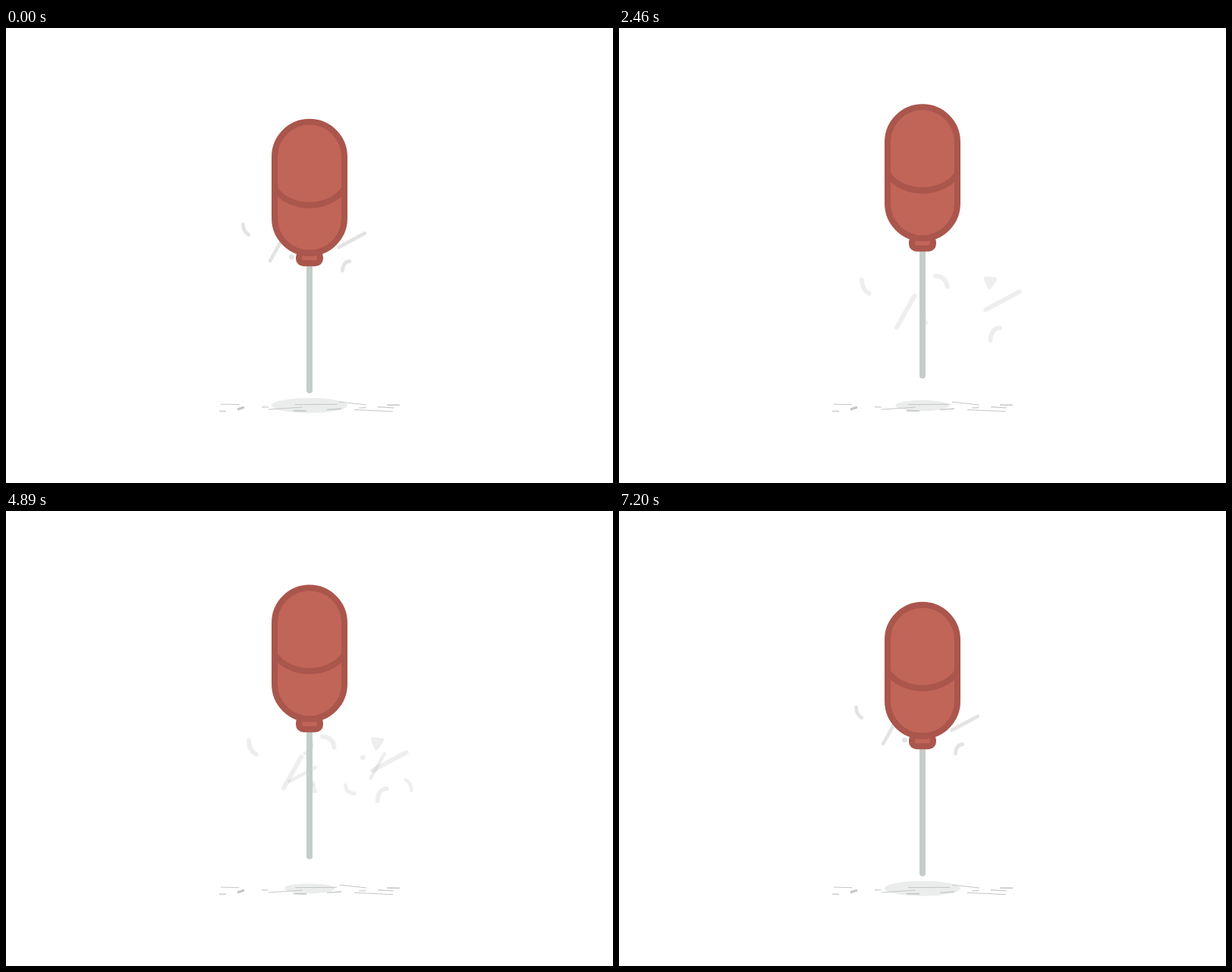
An HTML page with a canvas for the animation above (7230 ms loop, 800 px wide and 600 px high).

```html
<!DOCTYPE html>
<html lang="en">
<head>
<meta charset="utf-8">
<title>Floating balloon</title>
<style>
html, body { margin: 0; width: 100%; height: 100%; overflow: hidden; background: #fff; }
canvas { display: block; }
</style>
</head>
<body>
<canvas id="stage" width="800" height="600"></canvas>
<script>
const ctx = document.getElementById('stage').getContext('2d');
const LOOP = 7230, CYCLE = 7200, STEP = 30, RISE = 27;
const FILL = '#c16558', EDGE = '#aa564c', STICK = '#c5cdc9', SHADOW = '#ebedec';

// Confetti, with y measured from the top of the leftmost curl
const strokes = new Path2D(
  'M312.5 .5Q312.5 10.5 320 14.5M366 17L348 49M473 12.5L438.5 31' +
  'M453 49.5Q444 50 443.5 62M387.5 -3.5Q398 -3 399.5 7.5');
const wedge = new Path2D('M439 -1L448 0L442.5 8Z');

// Times in seconds: ramp up to speed, then fall steadily; visible and dark spans
const slow = { speed: 62.8, ramp: 1.5, end: 4.2, dark: [1.65, 2.52] };
const fast = { speed: 110, ramp: 0.94, end: 2.66, dark: [1.05, 1.7] };
const large = d => [1.295, 0, 0, 1.295, 320 - 312.5 * 1.295, 156.5 + d];
const turned = d => [-1, 0, 0, -1, 817 + 0.26 * d, 254.6 + d];
const small = d => [1, 0, 0, 1, 0, 170.2 + d];
const bursts = [
  { start: 400, ...fast, place: large },
  { start: 2317, ...slow, end: 3.95, place: turned },
  { start: 3097, ...fast, place: large },
  { start: 5050, ...slow, place: small }
];

// x1, y1, x2, y2, thickness
const ground = [
  [283, 496, 307, 496.7, 1], [281, 505.2, 290, 505.4, 1.2], [305, 503, 314, 500, 3],
  [337, 499.6, 346, 500, 1.2], [346, 503, 391, 500, 1.2], [379, 504.6, 396, 504.9, 1.8],
  [381, 496.6, 436, 496.3, 1], [423, 503.4, 442, 502, 1.4], [439, 493, 475, 497, 1.1],
  [465, 501, 474, 500.6, 1.2], [490, 499.6, 511, 501, 1.2], [502, 497, 519, 497.2, 1.5],
  [459, 503.4, 510, 505.7, 1]
];

// cubic-bezier(.42, 0, .58, 1)
function easeInOut(x) {
  let lo = 0, hi = 1, s;
  for (let i = 0; i < 24; i++) {
    s = (lo + hi) / 2;
    const u = 1 - s;
    if (3 * u * u * s * 0.42 + 3 * u * s * s * 0.58 + s ** 3 < x) lo = s; else hi = s;
  }
  return s * s * (3 - 2 * s);
}

function line(x1, y1, x2, y2, width) {
  ctx.lineWidth = width;
  ctx.beginPath();
  ctx.moveTo(x1, y1);
  ctx.lineTo(x2, y2);
  ctx.stroke();
}

function box(x, y, w, h, r) {
  ctx.beginPath();
  ctx.roundRect(x, y, w, h, r);
  ctx.fill();
  ctx.stroke();
}

function drawBurst({ start, speed, ramp, end, dark, place }, t) {
  const age = (t - start + CYCLE) % CYCLE / 1000;
  if (age < 0.18 || age > end) return;
  const fallen = speed * (age < ramp ? age * age / (2 * ramp) : age - ramp / 2);
  const isDark = age > dark[0] && age < dark[1];
  ctx.save();
  ctx.transform(...place(fallen));
  ctx.fillStyle = ctx.strokeStyle = `rgba(0,0,0,${isDark ? 0.11 : 0.068})`;
  ctx.lineCap = ctx.lineJoin = 'round';
  ctx.lineWidth = 4.6;
  ctx.stroke(strokes);
  // Rounded wedge and dot, each painted once so the tint stays even
  ctx.fill(new Path2D('M438.5 -3L448.5 -2Q451 -1 449.5 1.5L444.5 9Q442.5 11 440.5 9L437 1Q436 -3 438.5 -3Z'));
  ctx.beginPath();
  ctx.arc(376.5, 44, 3.5, 0, 7);
  ctx.fill();
  ctx.restore();
}

function drawBalloon(lift) {
  ctx.save();
  ctx.translate(0, -lift);
  ctx.lineCap = 'round';
  ctx.strokeStyle = STICK;
  line(400, 305, 400, 477.7, 8);
  ctx.lineCap = 'butt';
  ctx.fillStyle = FILL;
  ctx.strokeStyle = EDGE;
  ctx.lineWidth = 8;
  box(386, 296, 28, 14.2, 6);
  box(354, 123.8, 92, 173, 46);
  ctx.stroke(new Path2D('M354 211.7C374 241 426 241 446 211.7'));
  ctx.restore();
}

function draw(t) {
  const phase = t % 3600 / 1800;
  const up = easeInOut(phase < 1 ? phase : 2 - phase);
  ctx.fillStyle = '#fff';
  ctx.fillRect(0, 0, 800, 600);
  ctx.fillStyle = SHADOW;
  ctx.beginPath();
  ctx.ellipse(400, 497.8, 50 - 20 * up, 10 - 4 * up, 0, 0, 7);
  ctx.fill();
  ctx.strokeStyle = '#c3c7c5';
  ground.forEach(mark => line(...mark));
  bursts.forEach(burst => drawBurst(burst, t));
  drawBalloon(RISE * up);
}

const began = performance.now();
function tick() {
  const t = (performance.now() - began) % LOOP;
  draw(Math.floor(t / STEP) * STEP % CYCLE);
  requestAnimationFrame(tick);
}
tick();
</script>
</body>
</html>
```
